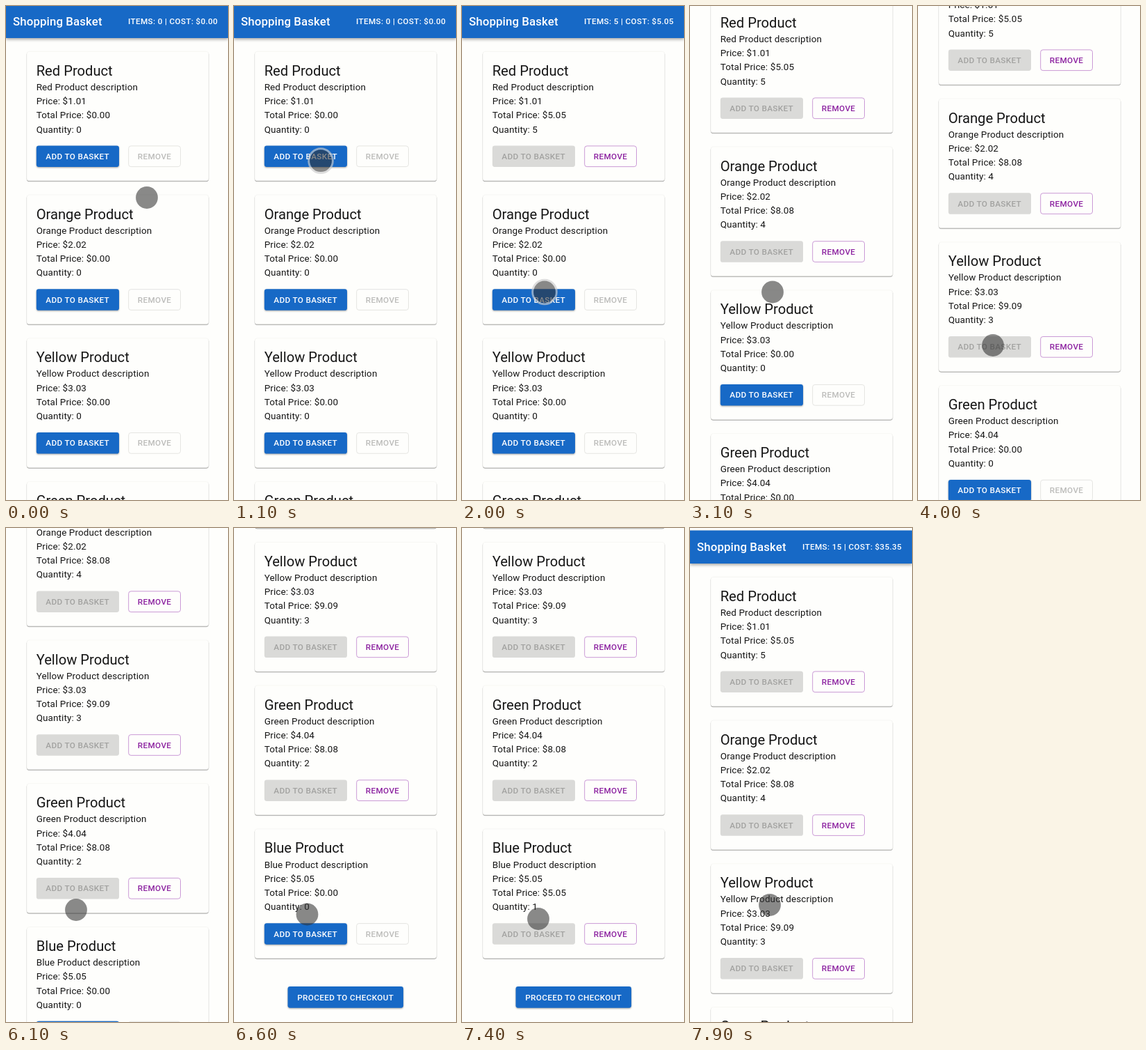
Animation, 320 px wide and 709 px high, one loop 8000 ms. Source, as an HTML page:

```html
<!DOCTYPE html>
<html lang="en">
<head>
<meta charset="utf-8">
<title>Shopping Basket</title>
<style>
  html, body { margin: 0; width: 100%; height: 100%; overflow: hidden; background: #fefefc; }
  svg { display: block; width: 320px; height: 709px; font-family: Roboto, sans-serif; fill: #161616; }
  .title { font-size: 20.16px; }
  .body { font-size: 13.44px; letter-spacing: .126px; }
  .btn { font-size: 11.76px; font-weight: 500; letter-spacing: .336px; }
  .head { font-size: 16.8px; font-weight: 500; letter-spacing: .126px; }
  .light { fill: #fff; }
  .bar { fill: #1769c6; filter: drop-shadow(0 2px 2px rgba(0, 0, 0, .35)); }
  .card { fill: #fefefc; stroke: #f1f1ee; stroke-width: .6; filter: drop-shadow(0 1px .7px rgba(0, 0, 0, .36)); }
  .solid { fill: #1769c6; filter: drop-shadow(0 1.2px 1px rgba(0, 0, 0, .36)); }
  .off .solid { fill: #dadad8; filter: none; }
  .off .solid + text { fill: #a2a2a0; }
  .line { fill: none; stroke: #c48fd2; stroke-width: .9; }
  .line + text { fill: #8c22a0; }
  .off .line { stroke: #e2e2df; }
  .off .line + text { fill: #bcbcba; }
</style>
</head>
<body>
<svg id="stage" viewBox="0 0 320 709"></svg>
<script>
const LOOP = 8000, STEP = 100, PITCH = 205.8, TAP_GAP = 140;
const stage = document.getElementById('stage');

function add(parent, tag, attrs, text) {
  const el = document.createElementNS('http://www.w3.org/2000/svg', tag);
  for (const k in attrs) el.setAttribute(k, attrs[k]);
  if (text) el.textContent = text;
  parent.appendChild(el);
  return el;
}
const label = (parent, x, y, cls, text) => add(parent, 'text', { x, y, class: cls }, text);
const box = (parent, x, y, width, height, cls, rx = 3.4) =>
  add(parent, 'rect', { x, y, width, height, rx, class: cls });

// Each product is tapped one time less than the one before it
const product = (name, firstTap, i) => ({
  name,
  price: 1.01 * (i + 1),
  taps: Array.from({ length: 5 - i }, (_, k) => firstTap + k * TAP_GAP)
});
const products = Object.entries({ Red: 1200, Orange: 2100, Yellow: 3700, Green: 5200, Blue: 6900 })
  .map(([name, firstTap], i) => product(name, firstTap, i));

// Pointer moves and page scrolls, in order
const rest = { x: 203, y: 275, scroll: 0 };
const gestures = [
  { at: 900, ms: 250, x: 116, y: 216 },
  { at: 1750, ms: 230, x: 119, y: 410.5 },
  { at: 2850, ms: 500, scroll: 138 },
  { at: 3350, ms: 250, x: 108, y: 487 },
  { at: 4250, ms: 550, scroll: 288 },
  { at: 4800, ms: 250, x: 101, y: 548 },
  { at: 6020, ms: 310, scroll: 456.5 },
  { at: 6450, ms: 300, x: 110, y: 561 },
  { at: 7420, ms: 430, x: 115, y: 541, scroll: -5 }
];

function ease(p) {
  p = Math.min(1, Math.max(0, p));
  return p * p * (3 - 2 * p);
}

function pose(t) {
  const now = { ...rest };
  for (const { at, ms, ...goal } of gestures) {
    const p = ease((t - at) / ms);
    for (const k in goal) now[k] += (goal[k] - now[k]) * p;
  }
  return now;
}

const page = add(stage, 'g', {});
box(page, 0, -1.5, 320, 47.5, 'bar', 0);
label(page, 10, 28, 'head light', 'Shopping Basket');
const summary = label(page, 305.3, 26.3, 'btn light', '');
summary.setAttribute('text-anchor', 'end');

products.forEach((p, i) => {
  const g = add(page, 'g', { transform: `translate(0 ${i * PITCH})` });
  box(g, 30, 65.2, 262, 185.6, 'card');
  label(g, 43.7, 99.8, 'title', p.name + ' Product');
  const line = (n, text) => label(g, 43.7, 120.9 + n * 20.2, 'body', text);
  line(0, p.name + ' Product description');
  line(1, 'Price: $' + p.price.toFixed(2));
  p.total = line(2, '');
  p.quantity = line(3, '');
  p.addBtn = add(g, 'g', {});
  box(p.addBtn, 43.8, 200.5, 119.2, 30.5, 'solid');
  label(p.addBtn, 57.3, 219.9, 'btn light', 'ADD TO BASKET');
  p.removeBtn = add(g, 'g', {});
  box(p.removeBtn, 176.7, 200.9, 74.8, 29.7, 'line');
  label(p.removeBtn, 189.8, 219.9, 'btn', 'REMOVE');
});

box(page, 77.5, 1114.6, 166.6, 30.6, 'solid');
label(page, 91.2, 1134.1, 'btn light', 'PROCEED TO CHECKOUT');

const pointer = add(stage, 'g', {});
const ring = add(pointer, 'circle', { r: 17.3, fill: 'none', stroke: '#ccc', 'stroke-opacity': .65, 'stroke-width': 3 });
add(pointer, 'circle', { r: 15.9, fill: '#303030', 'fill-opacity': .57 });

function draw(t) {
  let items = 0, cost = 0, pressed = false;
  for (const p of products) {
    const n = p.taps.filter(c => c <= t).length;
    const sum = n * p.price;
    items += n;
    cost += sum;
    pressed = pressed || p.taps.some(c => c > t && c <= t + STEP);
    p.total.textContent = 'Total Price: $' + sum.toFixed(2);
    p.quantity.textContent = 'Quantity: ' + n;
    p.addBtn.setAttribute('class', n === p.taps.length ? 'off' : '');
    p.removeBtn.setAttribute('class', n ? '' : 'off');
  }
  const { x, y, scroll } = pose(t);
  summary.textContent = `ITEMS: ${items} | COST: $${cost.toFixed(2)}`;
  page.setAttribute('transform', `translate(0 ${-scroll})`);
  pointer.setAttribute('transform', `translate(${x} ${y})`);
  ring.setAttribute('visibility', pressed ? 'visible' : 'hidden');
}

const start = performance.now();
function tick() {
  const t = (performance.now() - start) % LOOP;
  draw(Math.floor(t / STEP) * STEP);
  requestAnimationFrame(tick);
}
tick();
</script>
</body>
</html>
```
